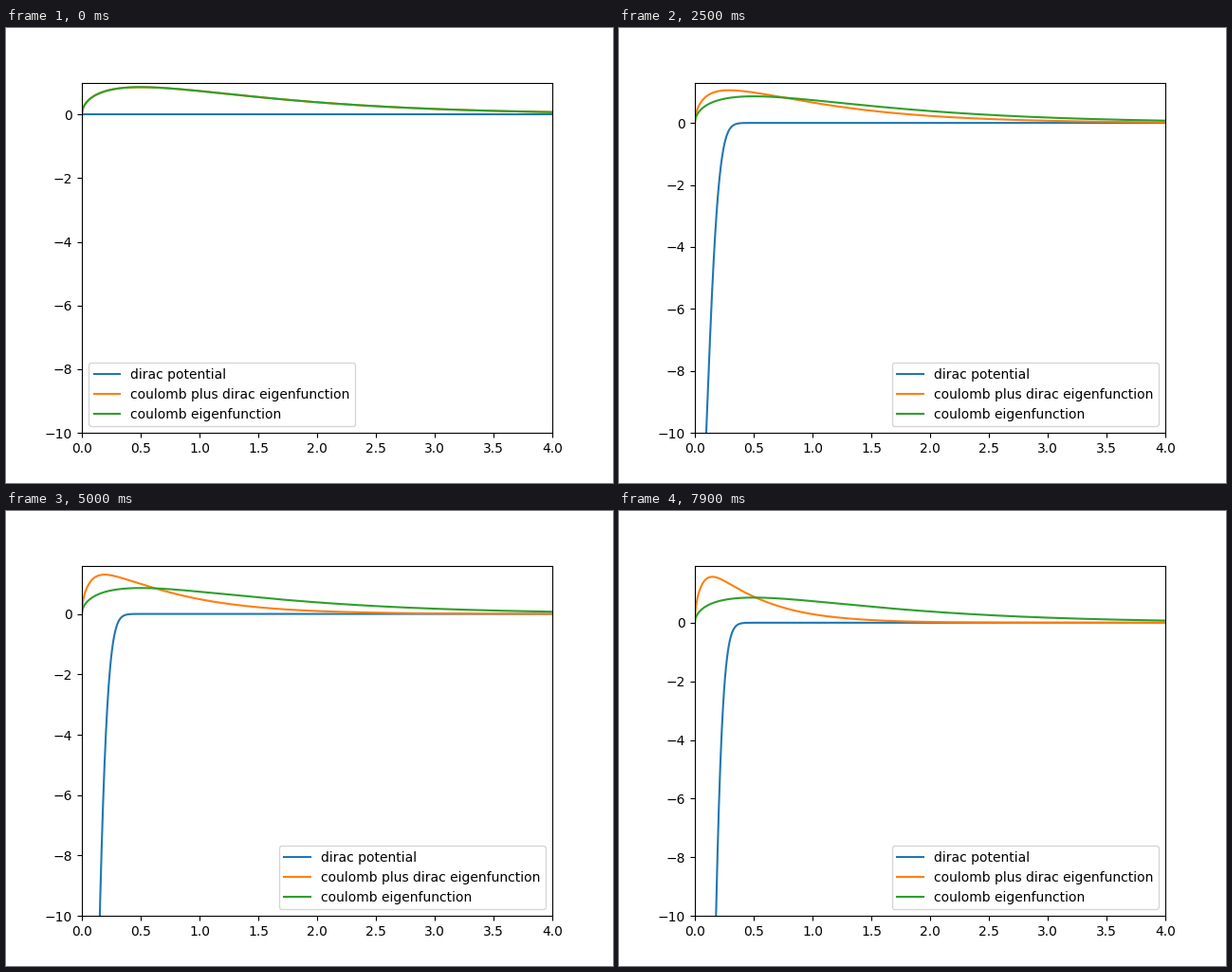
Animation, 640 px wide and 480 px high, one loop 8000 ms. Source, as a matplotlib script:

```python
import numpy as np
import matplotlib.pyplot as plt
from matplotlib.animation import FuncAnimation
from numpy.polynomial.laguerre import lagval, lagvander

FRAMES = 80
STEP = 0.04        # growth of the coupling per frame
SIGMA = 0.1        # width of the smeared delta
SIZE = 40          # number of Sturmian basis functions


def delta(r):
    """Two-dimensional delta function smeared into a Gaussian."""
    return np.exp(-r**2 / (2 * SIGMA**2)) / (2 * np.pi * SIGMA**2)


def build_matrices():
    """Coulomb Hamiltonian, overlap and delta matrices in exp(-r) L_n(2r)."""
    n = np.arange(SIZE)
    overlap = np.diag((2 * n + 1) / 4) - np.diag(n[1:] / 4, 1) - np.diag(n[1:] / 4, -1)
    coulomb = np.diag(n) - overlap
    dr = 0.0005
    q = np.arange(dr / 2, 1, dr)
    basis = lagvander(2 * q, SIZE - 1) * np.exp(-q)[:, None]
    well = basis.T @ (basis * (delta(q) * q * dr)[:, None])
    return coulomb, overlap, well


coulomb, overlap, well = build_matrices()
inv = np.linalg.inv(np.linalg.cholesky(overlap))
r = np.linspace(0, 4, 1000)


def ground_state(g):
    """Normalised radial ground state for coupling g."""
    _, vecs = np.linalg.eigh(inv @ (coulomb - g * well) @ inv.T)
    u = np.sqrt(r) * np.exp(-r) * lagval(2 * r, inv.T @ vecs[:, 0])
    return u * np.sign(u.sum())


fig, ax = plt.subplots(figsize=(6.4, 4.8), dpi=100)
potential, = ax.plot(r, 0 * r, label="dirac potential")
mixed, = ax.plot(r, ground_state(0), label="coulomb plus dirac eigenfunction")
ax.plot(r, 2 * np.sqrt(r) * np.exp(-r), label="coulomb eigenfunction")
ax.set_xlim(0, 4)
ax.set_ylim(-10, 1)
ax.legend(loc="best")


def update(i):
    g = STEP * i
    potential.set_ydata(-g * delta(r))
    mixed.set_ydata(ground_state(g))
    ax.set_ylim(-10, 1 + 0.3 * g)
    return potential, mixed


anim = FuncAnimation(fig, update, frames=FRAMES, interval=100,
                     repeat=True, repeat_delay=0, blit=False)
plt.show()
```
